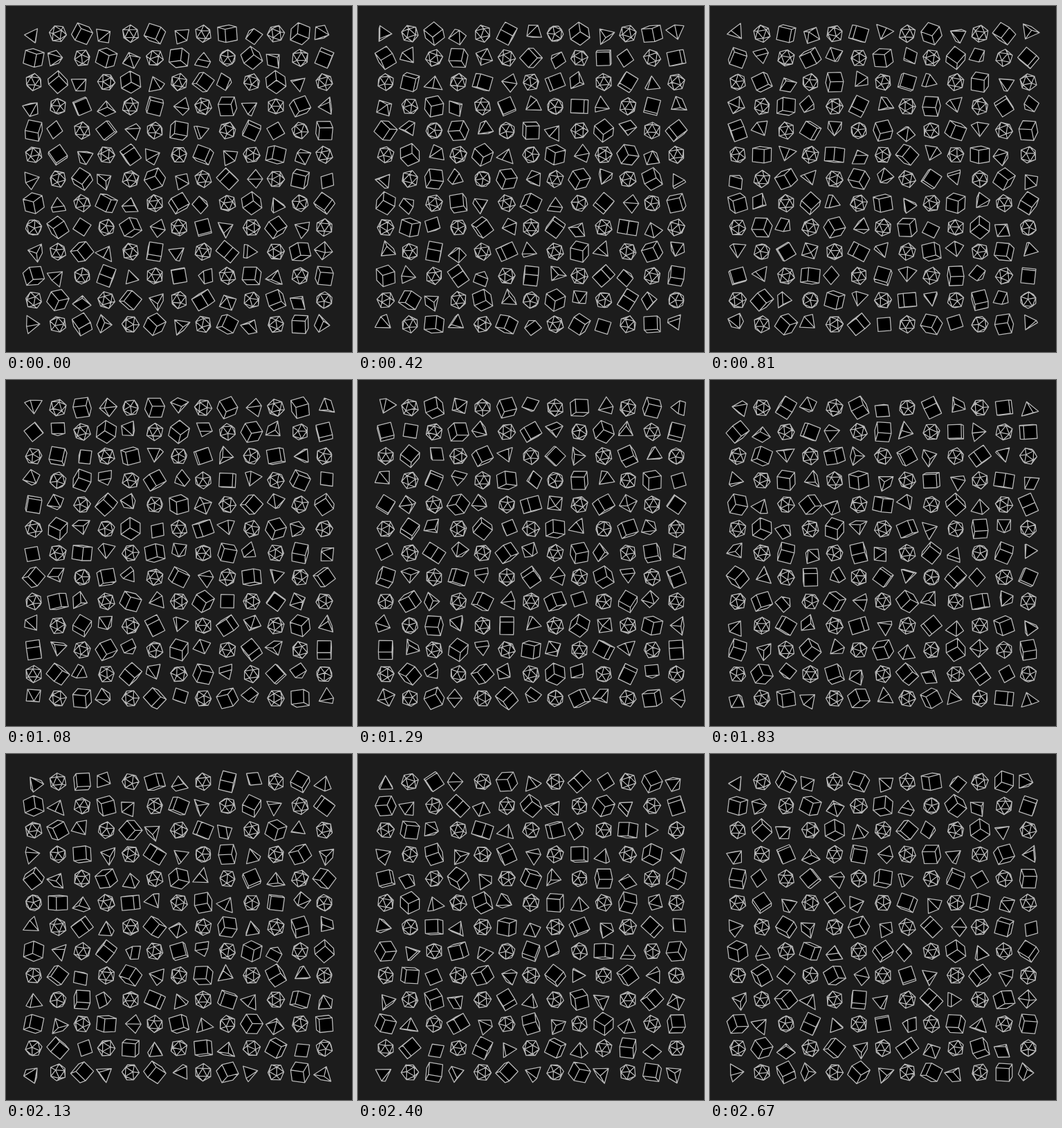
Recreate the animation shown at these times as an HTML page with a canvas. Size 500 by 500 pixels, loop 2700 ms.

```html
<!DOCTYPE html>
<html lang="en">
<head>
<meta charset="utf-8">
<title>Spinning solids</title>
<style>
html, body { margin: 0; height: 100%; overflow: hidden; background: #1c1c1c; }
canvas { display: block; }
</style>
</head>
<body>
<canvas id="stage" width="500" height="500"></canvas>
<script>
const ctx = document.getElementById('stage').getContext('2d');
const LOOP = 2700, STEP = 30, COUNT = 13, GAP = 35, MARGIN = 40;
const TAU = Math.PI * 2;

let seed = 7;
function random() {
  seed = (seed * 16807) % 2147483647;
  return seed / 2147483647;
}

const sub = (a, b) => a.map((v, i) => v - b[i]);
const dot = (a, b) => a[0] * b[0] + a[1] * b[1] + a[2] * b[2];
const cross = (a, b) => [
  a[1] * b[2] - a[2] * b[1],
  a[2] * b[0] - a[0] * b[2],
  a[0] * b[1] - a[1] * b[0]
];

// Turns every face so that its normal points away from the centre.
function solid(points, faces) {
  return {
    points,
    faces: faces.map(face => {
      const [a, b, c] = face.map(i => points[i]);
      return dot(cross(sub(b, a), sub(c, a)), a) < 0 ? [...face].reverse() : face;
    })
  };
}

function makeCube(half) {
  const points = [];
  for (let i = 0; i < 8; i++) points.push([1, 2, 4].map(bit => i & bit ? half : -half));
  return solid(points, [
    [0, 1, 3, 2], [4, 5, 7, 6], [0, 1, 5, 4],
    [2, 3, 7, 6], [0, 2, 6, 4], [1, 3, 7, 5]
  ]);
}

function makePyramid(half, height) {
  const base = height / 2;
  const points = [[-half, base, -half], [half, base, -half],
    [half, base, half], [-half, base, half], [0, -base, 0]];
  return solid(points, [[0, 1, 2, 3], [0, 1, 4], [1, 2, 4], [2, 3, 4], [3, 0, 4]]);
}

function makeIcosahedron(radius) {
  const golden = (1 + Math.sqrt(5)) / 2;
  const unit = radius / Math.hypot(1, golden);
  const points = [];
  for (const a of [-unit, unit])
    for (const b of [-unit * golden, unit * golden])
      points.push([0, a, b], [a, b, 0], [b, 0, a]);
  const near = (i, j) => Math.hypot(...sub(points[i], points[j])) < unit * 2.1;
  const faces = [];
  for (let i = 0; i < 12; i++)
    for (let j = i + 1; j < 12; j++)
      for (let k = j + 1; k < 12; k++)
        if (near(i, j) && near(j, k) && near(i, k)) faces.push([i, j, k]);
  return solid(points, faces);
}

function levelAxis() {
  const angle = random() * TAU;
  return [Math.cos(angle), 0, Math.sin(angle)];
}

function rotate(p, axis, angle) {
  const c = Math.cos(angle), s = Math.sin(angle);
  const side = cross(axis, p), along = dot(axis, p) * (1 - c);
  return p.map((v, i) => v * c + side[i] * s + axis[i] * along);
}

// Each solid starts roughly upright and then spins about its own level axis.
const solids = [makePyramid(9.5, 18), makeIcosahedron(12.7), makeCube(9.8)];
const items = [];
for (let row = 0; row < COUNT; row++) {
  for (let col = 0; col < COUNT; col++) {
    const { points, faces } = solids[(col - row + COUNT * 3) % 3];
    const yaw = random() * TAU, tilt = Math.acos(random()), tiltAxis = levelAxis();
    items.push({
      x: MARGIN + col * GAP,
      y: MARGIN + row * GAP,
      points: points.map(p => rotate(rotate(p, [0, 1, 0], yaw), tiltAxis, tilt)),
      faces,
      axis: levelAxis()
    });
  }
}

function drawItem({ x, y, points, faces, axis }, angle) {
  const turned = points.map(p => rotate(p, axis, angle));
  ctx.beginPath();
  for (const face of faces) {
    const [a, b, c] = face.map(i => turned[i]);
    if (cross(sub(b, a), sub(c, a))[2] <= 0) continue;
    face.forEach((i, n) => ctx[n ? 'lineTo' : 'moveTo'](x + turned[i][0], y + turned[i][1]));
    ctx.closePath();
  }
  ctx.fill();
  ctx.stroke();
}

function draw() {
  const time = Math.floor(performance.now() % LOOP / STEP) * STEP;
  ctx.fillStyle = '#1c1c1c';
  ctx.fillRect(0, 0, 500, 500);
  ctx.fillStyle = '#000';
  ctx.strokeStyle = '#b8b8b8';
  ctx.lineWidth = 1.3;
  ctx.lineJoin = 'round';
  for (const item of items) drawItem(item, time / LOOP * TAU + 0.26);
  requestAnimationFrame(draw);
}
draw();
</script>
</body>
</html>
```
